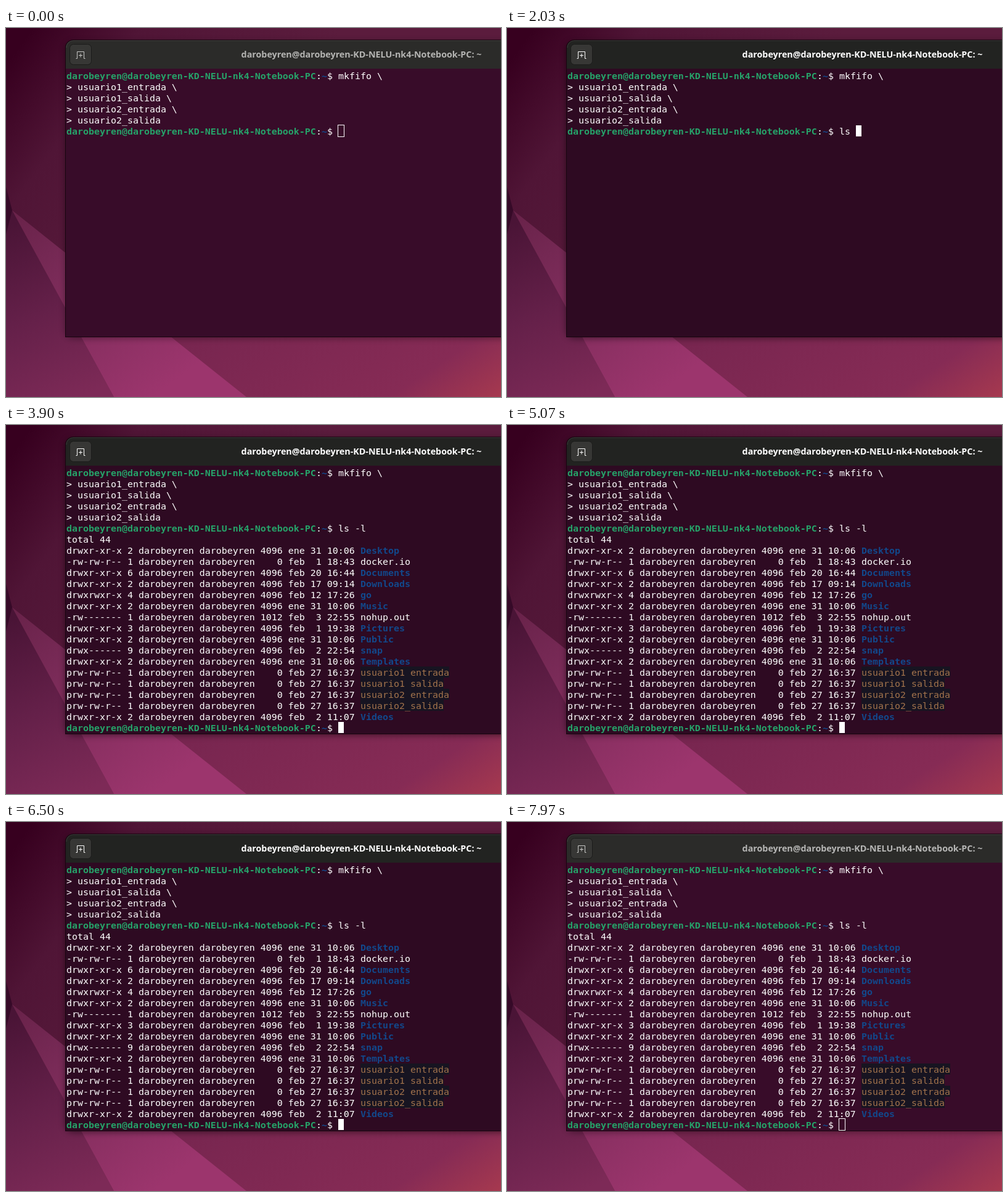
An HTML page for the animation above (8 s loop, 803 by 599 pixels).

```html
<!DOCTYPE html>
<html lang="es">
<head>
<meta charset="utf-8">
<title>Terminal</title>
<style>
html, body { margin: 0; width: 100%; height: 100%; overflow: hidden; background: #4a1233; }
svg { display: block; }
text { white-space: pre; }
.term text { font: 14.95px "DejaVu Sans Mono", "Noto Sans Mono", monospace; fill: #fff; }
.term .b { font-weight: 700; }
.term .green { fill: #26a269; }
.term .blue { fill: #12488b; }
.term .fifo { fill: #a2734c; }
#title { font: 700 14.3px "Noto Sans", "Open Sans", sans-serif; text-anchor: middle; }
</style>
</head>
<body>
<svg width="803" height="599" viewBox="0 0 803 599">
  <defs>
    <linearGradient id="sky" gradientUnits="userSpaceOnUse" x1="0" y1="60" x2="330" y2="300">
      <stop offset="0" stop-color="#37001f"/>
      <stop offset=".35" stop-color="#501536"/>
      <stop offset="1" stop-color="#5b1c3d"/>
    </linearGradient>
    <linearGradient id="left" gradientUnits="userSpaceOnUse" x1="0" y1="320" x2="120" y2="600">
      <stop offset="0" stop-color="#4a1436"/>
      <stop offset=".5" stop-color="#642049"/>
      <stop offset="1" stop-color="#7d2a57"/>
    </linearGradient>
    <linearGradient id="beam" gradientUnits="userSpaceOnUse" x1="10" y1="296" x2="240" y2="599">
      <stop offset="0" stop-color="#682249"/>
      <stop offset=".35" stop-color="#7a2b58"/>
      <stop offset="1" stop-color="#9c356d"/>
    </linearGradient>
    <linearGradient id="right" gradientUnits="userSpaceOnUse" x1="600" y1="300" x2="803" y2="599">
      <stop offset="0" stop-color="#782650"/>
      <stop offset=".72" stop-color="#862b55"/>
      <stop offset="1" stop-color="#a6394f"/>
    </linearGradient>
    <filter id="blur" x="-10%" y="-10%" width="120%" height="120%">
      <feGaussianBlur stdDeviation="6"/>
    </filter>
  </defs>

  <rect width="803" height="599" fill="url(#sky)"/>
  <rect x="200" y="450" width="603" height="149" fill="url(#right)"/>
  <path d="M0 330L10 296L175 599H0Z" fill="url(#left)"/>
  <path d="M10 296L390 599H175Z" fill="url(#beam)"/>
  <path d="M0 258L10 296L0 335Z" fill="#360a28"/>

  <rect id="shadow" x="97" y="23" width="760" height="480" rx="12" filter="url(#blur)"/>
  <path d="M96 502V32A13 13 0 0 1 109 19H803V502Z" fill="#17050f"/>
  <path id="body" d="M97 66H803V501H97Z"/>
  <path id="head" d="M97 66V32A12 12 0 0 1 109 20H803V66Z"/>
  <path d="M98 32A11 11 0 0 1 109 20.5H803" fill="none" stroke="#fff" stroke-opacity=".1"/>
  <rect x="103.5" y="26.5" width="35" height="33" rx="6" fill="#373735" stroke="#1b1b1a"/>
  <g id="icon" fill="none">
    <path d="M113.500 49.5H115.500V38.5H126.5V49.5H128.500"/>
    <path d="M118 44.5H124M121 41.500V47.500"/>
  </g>
  <text id="title" x="576.5" y="48"></text>

  <g class="term">
    <g id="intro"></g>
    <g id="listing"></g>
    <text id="typed" x="539" y="173"></text>
    <rect id="cursor"/>
  </g>
  <path id="mouse" d="M0 0V16L4 12.500L6.800 18.500L9.300 17.300L6.600 11.500H11.500Z"
        fill="#1c1c1c" stroke="#fff" stroke-width="1.1" stroke-linejoin="round"/>
</svg>

<script>
const LOOP = 8000, CELL = 9, LINE = 18, LEFT = 98, TOP = 68;
const USER = "darobeyren";
const HOST = USER + "-KD-NELU-nk4-Notebook-PC";
const NS = "http://www.w3.org/2000/svg";
const $ = id => document.getElementById(id);
const clamp = v => Math.max(0, Math.min(1, v));
const lerp = (a, b, p) => a + (b - a) * p;
const easeOut = p => 1 - (1 - p) ** 2;

function add(parent, tag, attrs, text = "") {
  const el = document.createElementNS(NS, tag);
  for (const key in attrs) el.setAttribute(key, attrs[key]);
  el.textContent = text;
  parent.append(el);
}

function put(parent, row, col, text, cls = "") {
  add(parent, "text", { x: LEFT + col * CELL, y: TOP + row * LINE + 15, class: cls }, text);
}

function prompt(parent, row) {
  const who = USER + "@" + HOST, n = who.length;
  put(parent, row, 0, who, "b green");
  put(parent, row, n, ":");
  put(parent, row, n + 1, "~", "b blue");
  put(parent, row, n + 2, "$");
}

const files = `drwxr-xr-x 2 4096 ene 31 10:06 Desktop
-rw-rw-r-- 1 0 feb 1 18:43 docker.io
drwxr-xr-x 6 4096 feb 20 16:44 Documents
drwxr-xr-x 2 4096 feb 17 09:14 Downloads
drwxrwxr-x 4 4096 feb 12 17:26 go
drwxr-xr-x 2 4096 ene 31 10:06 Music
-rw------- 1 1012 feb 3 22:55 nohup.out
drwxr-xr-x 3 4096 feb 1 19:38 Pictures
drwxr-xr-x 2 4096 ene 31 10:06 Public
drwx------ 9 4096 feb 2 22:54 snap
drwxr-xr-x 2 4096 ene 31 10:06 Templates
prw-rw-r-- 1 0 feb 27 16:37 usuario1_entrada
prw-rw-r-- 1 0 feb 27 16:37 usuario1_salida
prw-rw-r-- 1 0 feb 27 16:37 usuario2_entrada
prw-rw-r-- 1 0 feb 27 16:37 usuario2_salida
drwxr-xr-x 2 4096 feb 2 11:07 Videos`.split("\n");

function build() {
  const intro = $("intro"), listing = $("listing");
  $("title").textContent = `${USER}@${HOST}: ~`;
  prompt(intro, 0);
  put(intro, 0, 49, "mkfifo \\");
  ["usuario1_entrada \\", "usuario1_salida \\", "usuario2_entrada \\", "usuario2_salida"]
    .forEach((name, i) => put(intro, i + 1, 0, "> " + name));
  prompt(intro, 5);

  put(listing, 6, 0, "total 44");
  files.forEach((line, i) => {
    const [mode, links, size, month, day, time, name] = line.split(" ");
    const row = i + 7;
    put(listing, row, 0, [mode, links, USER, USER, size.padStart(4), month, day.padStart(2), time].join(" "));
    if (mode[0] === "p") {
      add(listing, "rect", { x: 575, y: TOP + row * LINE, width: name.length * CELL, height: LINE, fill: "#171421" });
    }
    put(listing, row, 53, name, { d: "b blue", p: "fifo" }[mode[0]]);
  });
  prompt(listing, 23);
}

const keyTimes = [1365, 1665, 2025, 2665, 3125];
const ENTER = 3895, FOCUS = 530, BLUR = 7865;
const cursorOff = [[1100, 1330], [2600, 2630], [3670, 3865], [4470, 5065], [5670, 6265], [6870, 7465]];

const mix = (a, b, p) => `rgb(${a.map((v, i) => Math.round(lerp(v, b[i], p)))})`;

function drawWindow(t) {
  const p = t < BLUR ? easeOut(clamp((t - 500) / 230)) : 1 - easeOut(clamp((t - 7840) / 160));
  $("body").setAttribute("fill", mix([56, 12, 41], [46, 10, 34], p));
  $("head").setAttribute("fill", mix([43, 43, 41], [34, 35, 33], p));
  $("title").setAttribute("fill", mix([180, 180, 178], [255, 255, 255], p));
  $("icon").setAttribute("stroke", mix([200, 200, 198], [255, 255, 255], p));
  $("shadow").setAttribute("opacity", lerp(.42, .55, p));
}

function drawCursor(t, count) {
  const done = t >= ENTER;
  const x = 539 + (done ? 0 : count * CELL);
  const y = TOP + (done ? 23 : 5) * LINE;
  const hollow = t < FOCUS || t >= BLUR;
  const hidden = cursorOff.some(([a, b]) => t >= a && t < b);
  const attrs = hollow
    ? { x: x - .5, y: y - .5, width: 10, height: 19, fill: "none", stroke: "#fff" }
    : { x, y, width: CELL, height: LINE, fill: "#fff", stroke: "none" };
  attrs.visibility = hidden ? "hidden" : "visible";
  for (const key in attrs) $("cursor").setAttribute(key, attrs[key]);
}

// Pointer path: time, x, y
const path = [[5690, 802, 339], [5866, 751, 407], [5930, 740, 435], [6200, 740, 435], [6490, 782, 496]];
const TICK = 1000 / 30;

// The pointer moves in steps at 30 per second
function drawMouse(time) {
  const t = Math.floor(time / TICK) * TICK;
  const i = path.findIndex((k, n) => n && t >= path[n - 1][0] && t < k[0]);
  $("mouse").setAttribute("visibility", i < 0 ? "hidden" : "visible");
  if (i < 0) return;
  const [t0, x0, y0] = path[i - 1], [t1, x1, y1] = path[i];
  const p = (t - t0) / (t1 - t0);
  $("mouse").setAttribute("transform", `translate(${lerp(x0, x1, p)} ${lerp(y0, y1, p)})`);
}

function draw(t) {
  const count = keyTimes.filter(k => t >= k).length;
  drawWindow(t);
  $("typed").textContent = "ls -l".slice(0, count);
  $("listing").setAttribute("visibility", t >= ENTER ? "visible" : "hidden");
  drawCursor(t, count);
  drawMouse(t);
}

build();
const start = performance.now();
function tick() {
  draw((performance.now() - start) % LOOP);
  requestAnimationFrame(tick);
}
tick();
</script>
</body>
</html>
```
